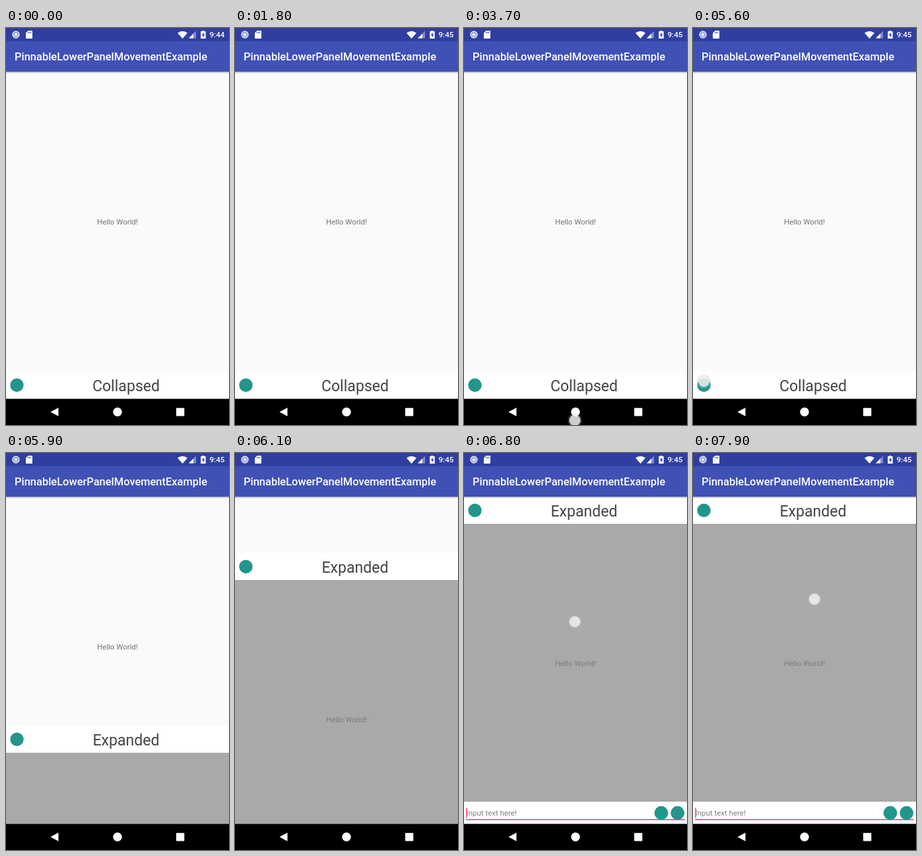
An HTML page for the animation above (8 s loop, 338x600 px).

```html
<!DOCTYPE html>
<html lang="en">
<head>
<meta charset="utf-8">
<title>Bottom sheet demo</title>
<style>
  html, body { margin: 0; width: 100%; height: 100%; overflow: hidden; background: #000; }
  svg { display: block; width: 338px; height: 600px; font-family: Roboto, sans-serif; }
  .bar { font-weight: 500; fill: #fff; }
  .small { font-size: 11.5px; }
  .mid { text-anchor: middle; }
  .icon { fill: #23968c; }
  .light { fill: #fff; }
  .accent { fill: #ff4081; }
</style>
</head>
<body>
<svg viewBox="0 0 338 600">
  <defs>
    <clipPath id="content"><rect y="66" width="338" height="494.5"/></clipPath>
    <linearGradient id="shade" x2="0" y2="1">
      <stop offset="0" stop-color="#555" stop-opacity=".45"/>
      <stop offset="1" stop-color="#555" stop-opacity="0"/>
    </linearGradient>
    <radialGradient id="halo">
      <stop offset=".65" stop-color="#c2c2c6" stop-opacity=".6"/>
      <stop offset="1" stop-color="#c2c2c6" stop-opacity="0"/>
    </radialGradient>
  </defs>

  <rect width="338" height="561" fill="#fafafa"/>
  <text class="small mid" x="169" y="297" fill="#737373">Hello World!</text>

  <g clip-path="url(#content)">
    <g id="sheet">
      <rect width="338" height="495" fill="#fff"/>
      <rect y="41" width="338" height="420" fill="#a9a9a9"/>
      <circle class="icon" cx="16.5" cy="20.7" r="10.2"/>
      <text id="label" class="mid" x="182" y="29.7" font-size="23.1" fill="#444">Collapsed</text>
      <text class="small mid" x="169" y="255.5" fill="#7c7c7c">Hello World!</text>
      <text class="small" x="3.5" y="482" fill="#808080">Input text here!</text>
      <rect class="accent" x="3" y="487.3" width="332" height="1.6"/>
      <rect id="caret" class="accent" x="3.2" y="470" width="1.5" height="15.5"/>
      <circle class="icon" cx="299" cy="478" r="10.4"/>
      <circle class="icon" cx="323.7" cy="478" r="10.4"/>
    </g>
  </g>

  <rect y="66" width="338" height="3" fill="url(#shade)"/>
  <rect y="20" width="338" height="46" fill="#3f51b5"/>
  <text class="bar" x="13" y="49" font-size="16.45">PinnableLowerPanelMovementExample</text>

  <rect width="338" height="20" fill="#303f9f"/>
  <circle cx="15" cy="10" r="4.9" fill="#8d96c8" stroke="#e3e6f2" stroke-width="1.6"/>
  <circle cx="15" cy="10" r="2.6" fill="#e3e6f2"/>
  <path class="light" d="M33.5 4H39q1 0 1 1v10q0 1-1 1h-8q-1 0-1-1V7.5z"/>
  <path d="M33.5 6v2M35.5 6v2M37.5 6v2" stroke="#303f9f"/>
  <path class="light" d="M260 7.5Q267.5 2 275 7.5L267.5 16z"/>
  <path d="M288 4.5V15.5H277z" fill="#838cc5"/>
  <path class="light" d="M284 8.5V15.5H277z"/>
  <path class="light" d="M297 5V4h3.500v1h2.200v11h-7.500V5z"/>
  <path d="M299.6 6.5L296.8 11h1.800v3.500l2.800-4.700h-1.800z" fill="#303f9f"/>
  <text id="clock" class="bar" x="331.5" y="14" font-size="11.7" text-anchor="end">9:44</text>

  <rect y="560.5" width="338" height="39.5"/>
  <path class="light" d="M67.5 580.3L79.5 573.8V586.8z"/>
  <circle class="light" cx="169" cy="580.3" r="6.7"/>
  <rect class="light" x="258" y="574.3" width="12.3" height="12.3" rx=".8"/>

  <g id="touch">
    <circle r="11.5" fill="url(#halo)"/>
    <circle r="8.3" fill="#fff" fill-opacity=".65"/>
  </g>
</svg>
<script>
  const LOOP = 8000, STEP = 100;
  // The sheet lifts a little on the tap, pauses, then settles open.
  const CLOSED = 519, LIFTED = 493, OPEN = 66;
  const TAP_END = 5700, SETTLE_AT = 5865, SETTLE = 850;
  const el = id => document.getElementById(id);
  const sheet = el('sheet'), label = el('label'), caret = el('caret');
  const clock = el('clock'), touch = el('touch');

  // Each gesture is a list of [time, x, y]; it lifts at the last time.
  const gestures = [
    [[3100, 170, 540], [3400, 172, 330], [3700, 168, 593], [3800, 171, 504], [3900, 171, 504], [4300, 172, 488]],
    [[5600, 16.5, 534], [TAP_END, 16.5, 534]],
    [[6800, 168, 255], [6900, 168, 258], [7000, 168, 258], [7450, 176, 410], [7900, 184, 221], [LOOP, 184, 221]]
  ];

  const ease = p => p * p * (3 - 2 * p);

  function touchAt(t) {
    for (const g of gestures) {
      const i = g.findIndex((p, n) => n && t >= g[n - 1][0] && t < p[0]);
      if (i < 1) continue;
      const [t0, x0, y0] = g[i - 1], [t1, x1, y1] = g[i];
      const k = ease((t - t0) / (t1 - t0));
      return [x0 + (x1 - x0) * k, y0 + (y1 - y0) * k];
    }
    return null;
  }

  function sheetTop(t) {
    if (t < TAP_END) return CLOSED;
    const p = Math.min(1, Math.max(0, (t - SETTLE_AT) / SETTLE));
    return Math.round(OPEN + (LIFTED - OPEN) * (1 - p) ** 5);
  }

  const show = (node, on) => node.setAttribute('visibility', on ? 'visible' : 'hidden');
  const move = (node, x, y) => node.setAttribute('transform', `translate(${x} ${y})`);

  function draw(t) {
    move(sheet, 0, sheetTop(t));
    label.textContent = t < TAP_END ? 'Collapsed' : 'Expanded';
    clock.textContent = t < 1500 ? '9:44' : '9:45';
    show(caret, (t + 200) % 1000 < 500);
    const p = touchAt(t);
    show(touch, p);
    if (p) move(touch, ...p);
  }

  const start = performance.now();
  function tick() {
    const t = (performance.now() - start) % LOOP;
    draw(Math.floor(t / STEP) * STEP);
    requestAnimationFrame(tick);
  }
  tick();
</script>
</body>
</html>
```
